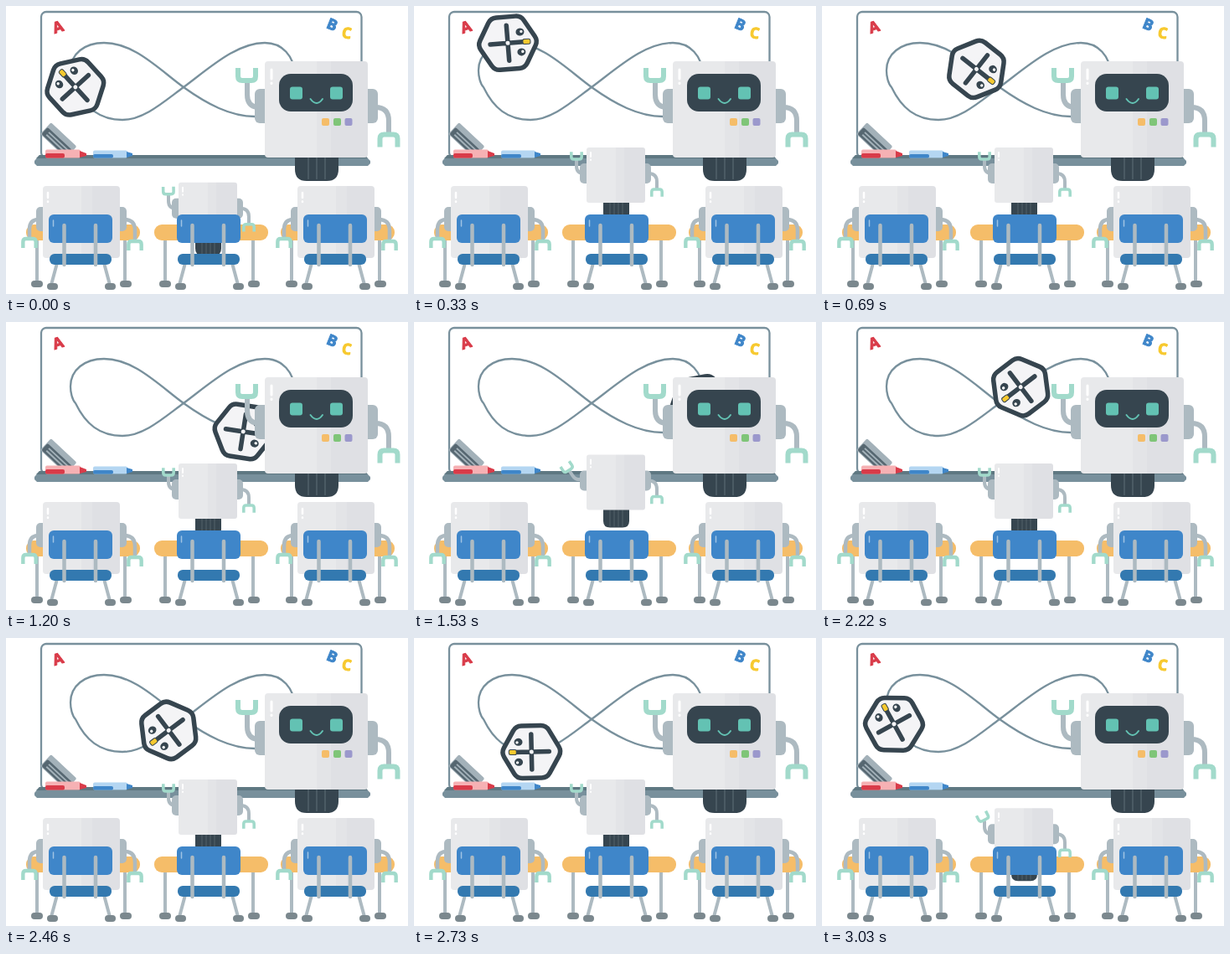
An HTML page for the animation above (3060 ms loop, 480x344 px).

```html
<!DOCTYPE html>
<html lang="en">
<head>
<meta charset="utf-8">
<title>Robot classroom</title>
<style>
html, body { margin: 0; height: 100%; overflow: hidden; background: #fff; }
svg { display: block; width: 100vw; height: 100vh; }
.line { fill: none; stroke: #78909c; stroke-width: 2.3; }
.limb { fill: none; stroke: #adbac1; }
.joint { fill: #adbac1; }
.dark { fill: #36454f; }
.claw { fill: none; stroke: #a2dacb; stroke-width: 6; }
.foot { fill: #7b888e; }
.shine { fill: none; stroke: #fff; stroke-linecap: round; }
text { font: bold 18px "Open Sans", Inter, sans-serif; text-anchor: middle; stroke-width: 1; stroke-linejoin: round; }
</style>
</head>
<body>
<svg viewBox="0 0 480 344">
<defs>
  <linearGradient id="shell">
    <stop offset=".5" stop-color="#e8e9eb"/><stop offset=".5" stop-color="#e3e4e7"/>
    <stop offset=".64" stop-color="#e3e4e7"/><stop offset=".64" stop-color="#dfe0e4"/>
  </linearGradient>
  <path id="claw" class="claw" d="M-10.5-15v10q0 5 5 5h11q5 0 5-5v-10"/>
  <path id="hex" stroke-linejoin="round" d="M23 0L11.5 20H-11.5L-23 0L-11.5-20H11.5Z"/>
  <g id="desk">
    <path class="limb" stroke-width="4" d="M37 276V330M142 276V330"/>
    <rect class="foot" x="30" y="328" width="14" height="8" rx="4"/>
    <rect class="foot" x="136" y="328" width="14" height="8" rx="4"/>
    <rect x="24" y="261" width="136" height="19" rx="9" fill="#f5bd69"/>
  </g>
  <g id="chair">
    <path class="limb" stroke-width="4" d="M61 307L54 333M117 307L124 333"/>
    <rect class="foot" x="49" y="331" width="13" height="8" rx="4"/>
    <rect class="foot" x="118" y="331" width="13" height="8" rx="4"/>
    <rect x="51" y="249" width="76" height="34" rx="6" fill="#3f86c9"/>
    <path class="shine" stroke-width="1.5" opacity=".5" d="M56.5 256V263"/>
    <rect x="52" y="296" width="74" height="13" rx="6" fill="#3379b0"/>
    <path class="limb" stroke-width="4.5" stroke-linecap="round" d="M69.5 262V309M107 262V309"/>
  </g>
  <g id="pupil">
    <use href="#desk"/>
    <rect class="joint" x="36" y="240" width="14" height="29" rx="5"/>
    <rect class="joint" x="130" y="240" width="14" height="29" rx="5"/>
    <path class="limb" stroke-width="4.5" d="M39 255Q28 255 28 267V277M141 255Q154 255 154 268V280"/>
    <use href="#claw" transform="translate(28 278) rotate(180) scale(.73)"/>
    <use href="#claw" transform="translate(154 281) rotate(180) scale(.73)"/>
    <rect x="44" y="215" width="92" height="86" rx="4" fill="url(#shell)"/>
    <path class="shine" stroke-width="2.5" d="M50 223V229M50 233.5V234"/>
    <use href="#chair"/>
  </g>
</defs>

<!-- board -->
<rect class="line" x="42" y="7" width="382.5" height="174" rx="6"/>
<text transform="translate(64 31) rotate(-18)" fill="#d93b49" stroke="#d93b49">A</text>
<text transform="translate(387 28) rotate(22)" fill="#3f86c9" stroke="#3f86c9">B</text>
<text transform="translate(406 38.5) rotate(8)" fill="#f7c92f" stroke="#f7c92f">C</text>
<path id="track" class="line" d="M83 97C79 93 77 84 77 77C77 57 94 44 117 44C153 44 182 75 212 97C240 117 268 132 297 132C322 132 345 108 345 82C344 60 330 44 309 44C275 44 243 74 212 97C190 113 165 136 139 136C112 136 95 122 83 97Z"/>
<path fill="#78909c" d="M40 178H428L435 185V188L432 191H37L34 188V185Z"/>
<path fill="#5f7882" d="M40 178H428L432 182H36Z"/>

<!-- eraser and markers -->
<g transform="translate(63 160) rotate(43)">
  <rect x="-21" y="-9" width="42" height="19" rx="2" fill="#a3b1b9"/>
  <rect x="-20" y="-2" width="40" height="11" rx="2" fill="#566771"/>
  <path stroke="#a3b1b9" stroke-width="2" d="M-15 1.500H18M-15 5.500H18"/>
</g>
<rect x="47" y="171.500" width="42" height="10" rx="2" fill="#f6b1b4"/>
<rect x="47" y="176" width="23" height="5.500" rx="2" fill="#d93b49"/>
<path fill="#d93b49" d="M88 173L96 176V179L88 181Z"/>
<rect x="104" y="172.500" width="41" height="9" rx="2" fill="#b4d6f2"/>
<rect x="104" y="177" width="24" height="4.500" rx="2" fill="#3f86c9"/>
<path fill="#3f86c9" d="M144 174L151 176V179L144 181Z"/>

<!-- rover on the track, facing +x -->
<g id="rover">
  <use href="#hex" fill="#36454f" stroke="#36454f" stroke-width="28"/>
  <use href="#hex" fill="#f4f4f6" stroke="#f4f4f6" stroke-width="17"/>
  <path stroke="#36454f" stroke-width="5.5" stroke-linecap="round" d="M-21 0H22M0-21V21"/>
  <circle r="2.5" fill="#f4f4f6"/>
  <ellipse class="dark" cx="15.5" cy="-12" rx="5" ry="4.5"/>
  <ellipse class="dark" cx="15.5" cy="12" rx="5" ry="4.5"/>
  <circle cx="17" cy="-12.5" r="1.7" fill="#fff"/>
  <circle cx="17" cy="11.5" r="1.7" fill="#fff"/>
  <rect x="18" y="-3" width="9" height="6" rx="2" fill="#f7c92f" stroke="#36454f"/>
</g>

<!-- teacher -->
<path class="dark" d="M345 178H397V195Q397 209 383 209H359Q345 209 345 195Z"/>
<path stroke="#52626b" stroke-width="1.5" d="M361 181V207M371 181V207M381 181V207"/>
<rect class="joint" x="297" y="99" width="18" height="41" rx="6"/>
<rect class="joint" x="426" y="99" width="18" height="41" rx="6"/>
<path class="limb" stroke-width="6" d="M301 121Q288 120 288 106V91M441 121Q457 121 457 137V152"/>
<use href="#claw" transform="translate(287.5 89)"/>
<use href="#claw" transform="translate(457 153.5) rotate(180)"/>
<rect x="309" y="66" width="123" height="115" rx="4" fill="url(#shell)"/>
<path class="shine" stroke-width="3" d="M317 76V87M317 92V92.500"/>
<rect class="dark" x="326" y="81" width="88" height="45" rx="14"/>
<g fill="#63c2b3">
  <rect x="339" y="96.500" width="15" height="15" rx="3"/>
  <rect x="387" y="96.500" width="15" height="15" rx="3"/>
</g>
<path fill="none" stroke="#63c2b3" stroke-width="2" stroke-linecap="round" d="M363.5 111Q371 121 378 111"/>
<rect x="377" y="134" width="9" height="9" rx="2" fill="#f5bd69"/>
<rect x="391" y="134" width="9" height="9" rx="2" fill="#7fc578"/>
<rect x="404.5" y="134" width="9" height="9" rx="2" fill="#9b98cc"/>

<!-- class -->
<use href="#pupil"/>
<use href="#pupil" x="304"/>
<use href="#desk" x="153"/>
<g id="hopper">
  <path class="dark" d="M226 60H257V79Q257 87 249 87H234Q226 87 226 79Z"/>
  <path stroke="#52626b" d="M234 66V86M239 66V86M244 66V86M249 66V86"/>
  <g id="arm">
    <path class="limb" stroke-width="4" d="M203 31Q194 31 194 22V15"/>
    <use id="hand" href="#claw"/>
  </g>
  <rect class="joint" x="198" y="19" width="14" height="24" rx="5"/>
  <rect class="joint" x="270" y="19" width="13" height="24" rx="5"/>
  <path class="limb" stroke-width="4" d="M280 31Q290 31 290 41V49"/>
  <use href="#claw" transform="translate(290 50) rotate(180) scale(.59)"/>
  <rect x="206" width="70" height="66" rx="3" fill="url(#shell)"/>
  <path class="shine" stroke-width="2" d="M211 6V11M211 14.500V15"/>
</g>
<use href="#chair" x="153"/>
</svg>
<script>
const LOOP = 3060, RISE = 300;
const $ = id => document.getElementById(id);
const place = (id, value) => $(id).setAttribute("transform", value);
const track = $("track"), length = track.getTotalLength();

function moveRover(t) {
  const s = Math.min(t / LOOP * length, length - 1);
  const a = track.getPointAtLength(s), b = track.getPointAtLength(s + .5);
  const turn = Math.atan2(b.y - a.y, b.x - a.x) * 180 / Math.PI;
  place("rover", `translate(${a.x} ${a.y}) rotate(${turn})`);
}

function movePupil(t) {
  // low: 1 seated, 0 standing; hop: a parabolic jump with a wave
  const edge = Math.min(t, LOOP - t);
  const low = Math.max(0, 1 - edge / RISE) ** 2;
  const hop = Math.max(0, 1 - ((t - 1710) / 330) ** 2);
  place("hopper", `translate(0 ${169 + 42 * low - 15 * hop})`);
  place("arm", `rotate(${-48 * hop} 197 31)`);
  place("hand", `translate(194 14) rotate(${-180 * low * (1 - low)}) scale(.59)`);
}

const start = performance.now();

function draw() {
  const t = (performance.now() - start) % LOOP;
  moveRover(t);
  movePupil(t);
  requestAnimationFrame(draw);
}
draw();
</script>
</body>
</html>
```
